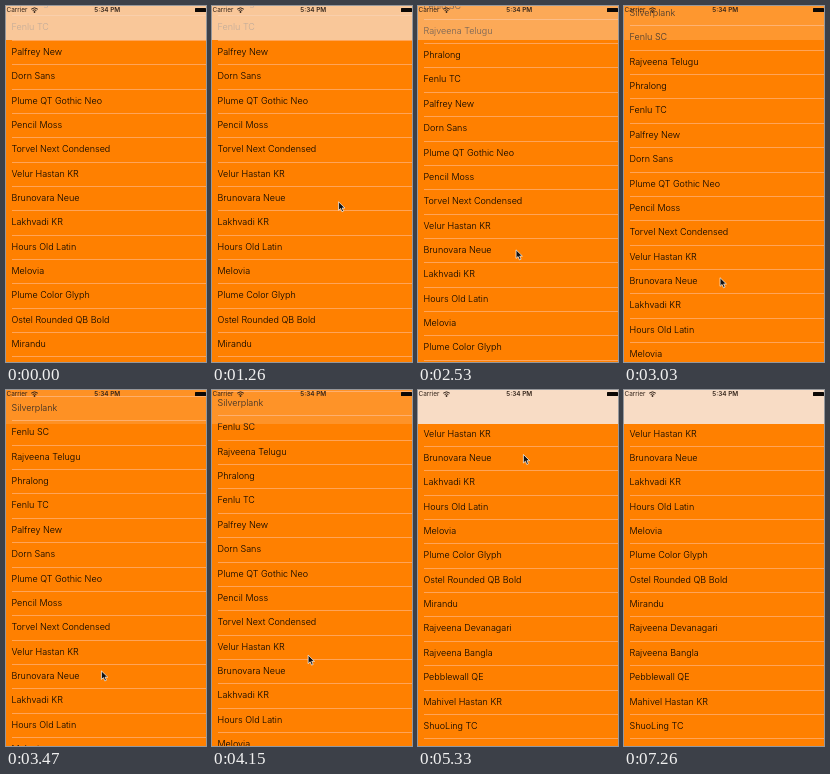
Animation of 200 by 356 pixels, one loop 7900 ms. Source, as an HTML page:

```html
<!DOCTYPE html>
<html lang="en">
<head>
<meta charset="utf-8">
<title>Font list</title>
<style>
  html, body { margin: 0; width: 100%; height: 100%; overflow: hidden; background: #ff8000; }
  #stage { position: relative; width: 200px; height: 356px; overflow: hidden;
    background: #ff8000; font-family: Inter, "Open Sans", sans-serif; color: #000; }
  #list { position: absolute; left: 5.5px; top: 0; width: 194.5px; margin: 0; padding: 0;
    list-style: none; border-bottom: 1px solid #ffa458; }
  #list li { box-sizing: border-box; height: 24.36px; white-space: nowrap; font-size: 9px;
    font-weight: 300; line-height: 21.8px; border-top: 1px solid #ffa458; }
  #bar { position: absolute; left: 0; top: 0; width: 200px; height: 34px; background: #f8dcc5; }
  svg { position: absolute; left: 0; top: 0; overflow: visible; }
  #status { font-size: 6.4px; fill: #33241a; }
</style>
</head>
<body>
<div id="stage">
  <ul id="list"></ul>
  <div id="bar"></div>
  <svg id="status" width="200" height="10">
    <text x="0.6" y="6.3">Carrier</text>
    <g fill="none" stroke="#33241a">
      <path d="M25.2 3.2Q28.5 .4 31.8 3.2"/>
      <path d="M26.6 4.6Q28.5 3 30.4 4.6"/>
    </g>
    <circle cx="28.5" cy="6" r=".9"/>
    <text x="101.3" y="6.3" text-anchor="middle" font-weight="600">5:34 PM</text>
    <rect x="189" y="2" width="11" height="4" rx=".5" fill="#0c0805"/>
  </svg>
  <svg id="cursor" width="8" height="12">
    <path d="M.4 .5V9L2.4 7.2L3.8 10.5L5.4 9.8L4 6.7H6.7Z" fill="#111" stroke="#fff" stroke-width=".7"/>
  </svg>
</div>
<script>
  const LOOP = 7900, TICK = 66, ROW = 24.36;
  const names = ["Silverplank", "Fenlu SC", "Rajveena Telugu", "Phralong", "Fenlu TC",
    "Palfrey New", "Dorn Sans", "Plume QT Gothic Neo", "Pencil Moss", "Torvel Next Condensed",
    "Velur Hastan KR", "Brunovara Neue", "Lakhvadi KR", "Hours Old Latin", "Melovia",
    "Plume Color Glyph", "Ostel Rounded QB Bold", "Mirandu", "Rajveena Devanagari",
    "Rajveena Bangla", "Pebblewall QE", "Mahivel Hastan KR", "ShuoLing TC"];
  const ANCHOR = names.indexOf("Palfrey New");

  // a sharpens the stop, b softens the start
  const ease = (a, b) => u => (1 - (1 - u) ** a) ** b;
  const glide = ease(2, 1.5);

  // Pointer x, y and the centre of the anchor row
  const rest = { x: 171, y: 219, row: 46 };
  const moves = [
    { start: 1020, end: 1440, to: { x: 102, y: 182.5 } },
    { start: 1790, end: 3690, to: { x: 95, y: 281, row: 141 },
      hand: ease(2.35, 1.22), scroll: ease(2.35, 1.55) },
    { start: 3990, end: 5330, to: { x: 105, y: 64, row: -77.8 },
      hand: ease(2.2, 1.64), scroll: ease(2.6, 2.53) },
    { start: 5680, end: 6640, to: { x: 181, y: 339 } },
    { start: 6940, end: 7260, to: { x: 182, y: 357 } },
  ];
  const SHOW = moves[0].start, HIDE = moves[moves.length - 1].end;

  const clamp = (v, lo, hi) => Math.min(hi, Math.max(lo, v));
  const $ = id => document.getElementById(id);
  const list = $("list"), bar = $("bar"), cursor = $("cursor");

  for (const name of names) {
    const li = document.createElement("li");
    li.textContent = name;
    list.append(li);
  }

  function pose(t) {
    const now = { ...rest };
    for (const { start, end, to, hand = glide, scroll = glide } of moves) {
      if (t < start) break;
      const steps = Math.round((end - start) / TICK);
      const u = Math.round(Math.min(1, (t - start) / (end - start)) * steps) / steps;
      for (const key in to)
        now[key] += (to[key] - now[key]) * (key === "row" ? scroll : hand)(u);
    }
    return now;
  }

  function draw(t) {
    const { x, y, row } = pose(t);
    list.style.transform = `translateY(${Math.round(row - (ANCHOR + 0.5) * ROW)}px)`;
    bar.style.opacity = clamp(0.78 - (row - 46) * 0.0065, 0.18, 1);
    cursor.style.transform = `translate(${x}px, ${y}px)`;
    cursor.style.visibility = t >= SHOW && t < HIDE ? "visible" : "hidden";
  }

  const begin = performance.now();
  function tick() {
    draw((performance.now() - begin) % LOOP);
    requestAnimationFrame(tick);
  }
  tick();
</script>
</body>
</html>
```
